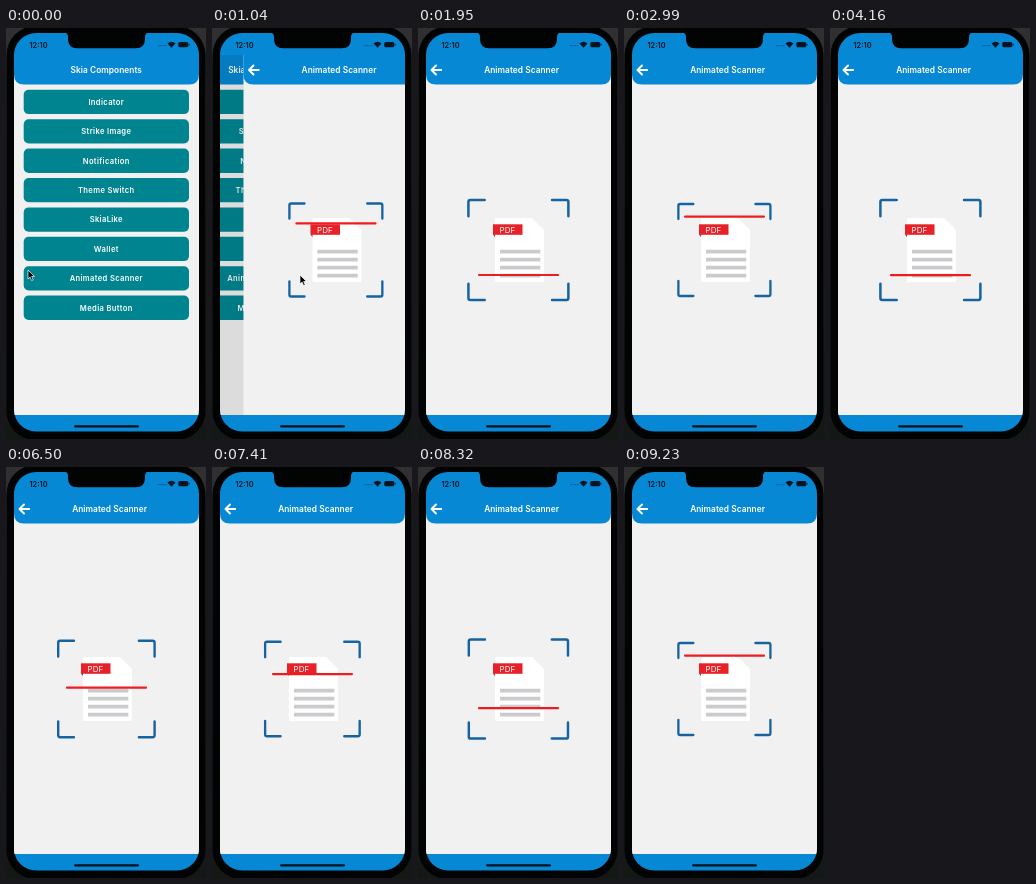
These frames come from a looping animation (200x411 px, 9360 ms). An HTML page:

```html
<!DOCTYPE html>
<html lang="en">
<head>
<meta charset="utf-8">
<title>Animated Scanner</title>
<style>
  html, body { margin: 0; width: 100%; height: 100%; overflow: hidden; background: #000; }
  svg { display: block; width: 100vw; height: 100vh; }
  text { font-family: Inter, Roboto, sans-serif; font-weight: 600; fill: #fff; text-anchor: middle; }
  .title { font-size: 8.3px; letter-spacing: .06px; }
  .label { font-size: 7.6px; letter-spacing: .35px; }
  .blue { fill: #0688d4; }
  .line { fill: none; stroke-linecap: round; stroke-linejoin: round; }
</style>
</head>
<body>
<svg viewBox="0 0 200 411">
  <defs>
    <linearGradient id="desk" x2="0" y2="1">
      <stop stop-color="#303030"/>
      <stop offset="1" stop-color="#141814"/>
    </linearGradient>
    <clipPath id="display"><rect x="8" y="5" width="185" height="398.500" rx="22"/></clipPath>
    <clipPath id="content"><rect x="8" y="27" width="185" height="360"/></clipPath>
    <g id="page">
      <rect x="8" y="27" width="185" height="361" fill="#f1f1f2"/>
      <path class="blue" d="M8 27H193V46.500Q193 56.500 183 56.500H18Q8 56.500 8 46.500Z"/>
    </g>
    <path id="corner" class="line" stroke="#17639f" stroke-width="2.300" d="M-46 -31V-44.200Q-46 -46 -44.200 -46H-31"/>
  </defs>

  <rect width="200" height="411" fill="url(#desk)"/>
  <rect x=".5" y="-2" width="199" height="414" rx="29" fill="#020303"/>

  <g clip-path="url(#display)">
    <rect class="blue" x="8" y="5" width="185" height="399"/>
    <g clip-path="url(#content)">
      <g id="menu">
        <use href="#page"/>
        <text class="title" x="100.300" y="45">Skia Components</text>
        <g id="buttons"></g>
      </g>
      <rect id="dim" x="8" y="27" width="185" height="361"/>
      <g id="scanner">
        <use href="#page"/>
        <path class="line" stroke="#fff" stroke-width="1.900" d="M23.200 42H13.700M18 37.500L13.500 42L18 46.500"/>
        <text class="title" x="103.600" y="45">Animated Scanner</text>
        <path fill="#fff" d="M78.500 190H114L126 202V252.500Q126 254 124.500 254H78.500Q77 254 77 252.500V191.500Q77 190 78.500 190Z"/>
        <path stroke="#cbcacd" stroke-width="3.700" d="M82 223.700H122.300M82 231.700H122.300M82 239.700H122.300M82 247.700H122.300"/>
        <path fill="#a81c22" d="M75 206.500H77V209Z"/>
        <rect x="75" y="196.300" width="29.500" height="10.500" fill="#e62128"/>
        <text x="89.400" y="204.500" style="font-size:8px;font-weight:400">PDF</text>
        <g id="frame">
          <use href="#corner"/>
          <use href="#corner" transform="scale(-1 1)"/>
          <use href="#corner" transform="scale(1 -1)"/>
          <use href="#corner" transform="scale(-1)"/>
        </g>
        <path id="beam" class="line" stroke="#ee1c20" stroke-width="2.200" d="M61 0H140"/>
      </g>
    </g>
  </g>

  <path fill="#020303" d="M58 4Q62 5 62 9V11Q62 20.300 71.300 20.300H129.700Q139 20.300 139 11V9Q139 5 143 4Z"/>
  <g fill="#061521">
    <text x="32.500" y="19.500" style="font-size:7.400px;fill:#061521">12:10</text>
    <path d="M152 17h1.300v1.300h-1.300zm2.400 0h1.300v1.300h-1.300zm2.400 0h1.300v1.300h-1.300zm2.400 0h1.300v1.300h-1.300z" opacity=".4"/>
    <path d="M161.500 15.500Q165.500 12 169.500 15.500L165.500 19.800Z"/>
    <rect x="172.300" y="14" width="10" height="5.200" rx="1.500"/>
    <rect x="182.700" y="15.700" width=".8" height="2" rx=".4"/>
  </g>
  <rect x="68" y="397.200" width="65" height="2.200" rx="1.100" fill="#04101a"/>
  <path id="cursor" fill="#000" stroke="#fff" stroke-width=".7" d="M0 0V9L2.100 7.100L3.600 10.500L5.200 9.800L3.700 6.500H6.500Z"/>
</svg>
<script>
const LOOP = 9360, STEP = 130, PUSH = 780, WIDTH = 185;
const labels = ["Indicator", "Strike Image", "Notification", "Theme Switch",
  "SkiaLike", "Wallet", "Animated Scanner", "Media Button"];
// Times at which the beam turns: top, bottom, top, ...
const turns = [PUSH, 1850, 2950, 4080, 5040, 6050, 6990, 8050, 9180, 10200];

const $ = id => document.getElementById(id);
const clamp = x => Math.min(1, Math.max(0, x));
const inOut = x => x < .5 ? 2 * x * x : 1 - 2 * (1 - x) ** 2;
const move = (id, x, y, extra = "") => $(id).setAttribute("transform", `translate(${x} ${y}) ${extra}`);

$("buttons").innerHTML = labels.map((label, i) => {
  const y = 61.8 + i * 29.4;
  return `<rect x="17.700" y="${y}" width="165.300" height="24.300" rx="5" fill="#008590"/>
    <text class="label" x="100.300" y="${y + 14.9}">${label}</text>`;
}).join("");

function scanDepth(t) {
  if (t <= PUSH) return 0;
  const i = turns.findIndex(turn => turn > t) - 1;
  const eased = inOut((t - turns[i]) / (turns[i + 1] - turns[i]));
  return i % 2 ? 1 - eased : eased;
}

function draw(t) {
  // Critically damped spring for the screen change
  const s = Math.max(0, t - PUSH) * .0138;
  const left = t > 1560 ? 0 : (1 + s) * Math.exp(-s);
  move("scanner", WIDTH * left, 0);
  move("menu", -.3 * WIDTH * (1 - left), 0);
  $("dim").setAttribute("opacity", .1 * (1 - left));

  const depth = scanDepth(t);
  move("beam", 0, 188.4 + 59.6 * depth);
  move("frame", 100.4, 222, `scale(${1 + .088 * depth})`);

  const glide = inOut(clamp((t - 260) / 780));
  move("cursor", 22 + 66 * glide, 242 + 5 * glide);
  $("cursor").setAttribute("visibility", t < 1560 ? "visible" : "hidden");
}

const start = performance.now();
function tick() {
  const t = (performance.now() - start) % LOOP;
  draw(Math.floor(t / STEP) * STEP);
  requestAnimationFrame(tick);
}
tick();
</script>
</body>
</html>
```
